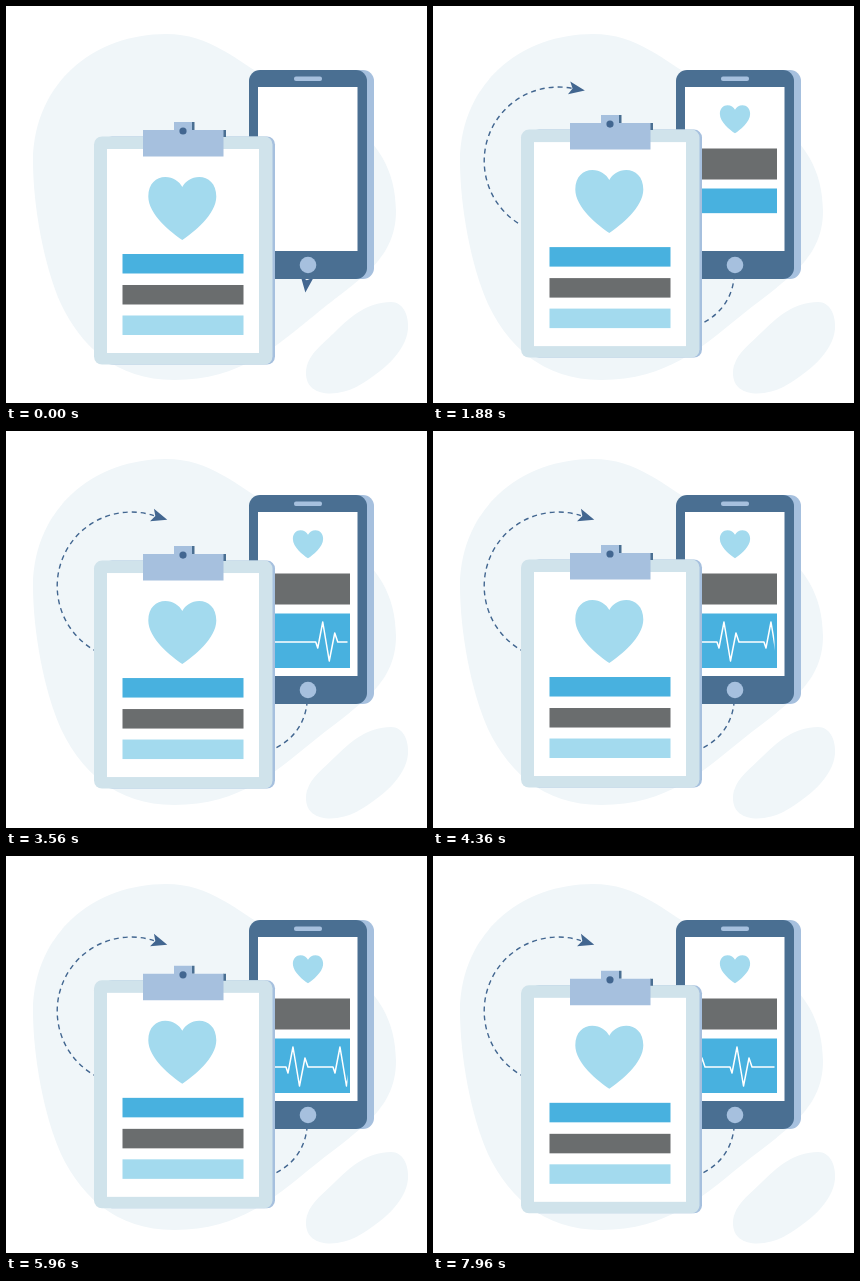
An HTML page for the animation above (8 s loop, 421 by 397 pixels).

```html
<!DOCTYPE html>
<html lang="en">
<head>
<meta charset="utf-8">
<title>Health record sync</title>
<style>
  html, body { margin: 0; width: 100%; height: 100%; overflow: hidden; background: #fff; }
  svg { display: block; width: 100%; height: 100%; }
  .pale { fill: #f0f6f9; }
  .navy { fill: #4a6f92; }
  .steel { fill: #a6c0de; }
  .board { fill: #d0e3eb; }
  .paper { fill: #fff; }
  .sky { fill: #a3daee; }
  .blue { fill: #48b1df; }
  .grey { fill: #6a6d6e; }
  .ink { fill: #426690; }
  .trail { fill: none; stroke: #426690; stroke-width: 1.4; }
  .pulse { fill: none; stroke: #fff; stroke-width: 1.5; stroke-linejoin: round; }
</style>
</head>
<body>
<svg viewBox="0 0 421 397">
  <defs>
    <path id="heart" d="M0 31.500C-11 24-34 6-34-12C-34-25-26-31.500-17-31.500C-9-31.500-3-27-0-21.500C3-27 9-31.500 17-31.500C26-31.500 34-25 34-12C34 6 11 24 0 31.500Z"/>
    <clipPath id="monitor"><rect x="255" y="183" width="86.500" height="54"/></clipPath>
  </defs>

  <path class="pale" d="M160 28C205 28 230 55 262 72C310 98 390 120 390 205C390 255 350 275 310 308C270 340 235 374 168 374C110 374 75 340 55 298C38 260 27 200 27 155C28 75 90 28 160 28Z"/>
  <path class="pale" d="M385 296C397 296 403 309 402 323C400 345 378 365 352 380C330 392 299 391 300 366C301 349 315 340 330 325C345 310 362 296 385 296Z"/>

  <path id="trail" class="trail" d="M301 272C299 292 288 308 268 318C220 340 130 250 88 219A74 74 0 0 1 147.900 84.600"/>
  <path id="head" class="ink" d="M14 0L-2-6.500L1.500 0L-2 6.500Z"/>

  <g id="phone">
    <rect class="steel" x="250" y="64" width="118" height="209" rx="11"/>
    <rect class="navy" x="243" y="64" width="118" height="209" rx="11"/>
    <rect class="paper" x="252" y="81" width="99.500" height="164"/>
    <rect class="steel" x="288" y="70.500" width="28" height="4.500" rx="2"/>
    <circle class="steel" cx="302" cy="259" r="8.300"/>
    <use id="badge" class="sky" href="#heart"/>
    <rect id="greyBar" class="grey" x="260" y="142.500" width="84" height="31"/>
    <rect id="blueBar" class="blue" x="260" y="182.500" width="84" height="54.500"/>
    <g clip-path="url(#monitor)"><path id="pulse" class="pulse"/></g>
  </g>

  <g id="clipboard">
    <rect class="steel" x="98" y="130.500" width="171" height="228" rx="8"/>
    <rect class="board" x="88" y="130.500" width="178.500" height="228" rx="8"/>
    <rect class="paper" x="101" y="143" width="152" height="204"/>
    <path class="navy" d="M186 116h2.500v8h-2.500zM217 124h3v7h-3z"/>
    <path class="steel" d="M168 116h18v8h31.500v26.500h-80.500v-26.500h31z"/>
    <circle class="ink" cx="177" cy="125" r="3.600"/>
    <use class="sky" href="#heart" x="176.300" y="202.500"/>
    <rect class="blue" x="116.500" y="248" width="121" height="19.500"/>
    <rect class="grey" x="116.500" y="279" width="121" height="19.500"/>
    <rect class="sky" x="116.500" y="309.500" width="121" height="19.500"/>
  </g>
</svg>
<script>
const LOOP = 8000, BOB = 1910, LIFT = 7, DASH = 5, GAP = 4;
const BEAT = 47, BASELINE = 211;
const $ = id => document.getElementById(id);
const [trail, head, badge, greyBar, blueBar, pulse, clipboard] =
  ['trail', 'head', 'badge', 'greyBar', 'blueBar', 'pulse', 'clipboard'].map($);
const trailLength = trail.getTotalLength();

// [time, value] knots: distance left on the trail, x of the first heartbeat
const trailLeft = [[0, trailLength], [400, 220], [840, 81], [1200, 43], [1700, 15], [2520, 0]];
const beatX = [[2560, 348], [2680, 345], [4360, 291], [5960, 240], [7080, 218], [7960, 210]];

const clamp = v => Math.min(1, Math.max(0, v));
const progress = (t, from, to) => clamp((t - from) / (to - from));
const smooth = u => u * u * (3 - 2 * u);

// Smooth curve through the knots
function track(knots, t) {
  const last = knots.length - 1;
  if (t <= knots[0][0]) return knots[0][1];
  if (t >= knots[last][0]) return knots[last][1];
  const i = knots.findIndex(k => k[0] > t) - 1;
  const slope = k => {
    const a = knots[Math.max(0, k - 1)], b = knots[Math.min(last, k + 1)];
    return (b[1] - a[1]) / (b[0] - a[0]);
  };
  const [t0, v0] = knots[i], [t1, v1] = knots[i + 1];
  const d = t1 - t0, u = (t - t0) / d;
  return v0 + (v1 - v0) * smooth(u)
    + d * u * (1 - u) * ((1 - u) * slope(i) - u * slope(i + 1));
}

// Dashes are anchored to the arrowhead, so they travel with it
function drawTrail(t) {
  const reach = Math.max(0, trailLength - track(trailLeft, t));
  const shown = reach > 0.5 ? 'visible' : 'hidden';
  const count = Math.floor(reach / (DASH + GAP));
  const rest = reach - count * (DASH + GAP);
  const dashes = [0, Math.max(0, rest - DASH), Math.min(rest, DASH)];
  for (let i = 0; i < count; i++) dashes.push(GAP, DASH);
  trail.setAttribute('stroke-dasharray', [...dashes, 9999].join(' '));

  const p = trail.getPointAtLength(reach);
  const a = trail.getPointAtLength(Math.max(0, reach - 1));
  const b = trail.getPointAtLength(Math.min(trailLength, reach + 1));
  const angle = Math.atan2(b.y - a.y, b.x - a.x) * 180 / Math.PI;
  head.setAttribute('transform', `translate(${p.x} ${p.y}) rotate(${angle})`);
  trail.style.visibility = head.style.visibility = shown;
}

function drawPulse(t) {
  const x = track(beatX, t);
  const shape = [[-7, 0], [-5, 6], [0, -20], [6.5, 19], [12, -9], [15, 0]];
  const points = [[200, BASELINE]];
  for (let n = 0; n < 5; n++)
    for (const [dx, dy] of shape) points.push([x + n * BEAT + dx, BASELINE + dy]);
  pulse.setAttribute('d', 'M' + points.join('L'));
  pulse.style.visibility = t >= 2560 ? 'visible' : 'hidden';
}

function render(t) {
  const swing = t / BOB % 2;
  const lift = LIFT * (1 - Math.abs(1 - swing));
  clipboard.setAttribute('transform', `translate(0 ${-lift})`);
  drawTrail(t);
  const size = 0.445 * smooth(progress(t, 820, 1140));
  badge.setAttribute('transform', `translate(302 113.300) scale(${size})`);
  greyBar.setAttribute('height', 31 * smooth(progress(t, 1080, 1600)));
  blueBar.setAttribute('height', 54.5 * smooth(progress(t, 1600, 2200)));
  drawPulse(t);
}

const start = performance.now();
function frame() {
  render((performance.now() - start) % LOOP);
  requestAnimationFrame(frame);
}
render(0);
requestAnimationFrame(frame);
</script>
</body>
</html>
```
